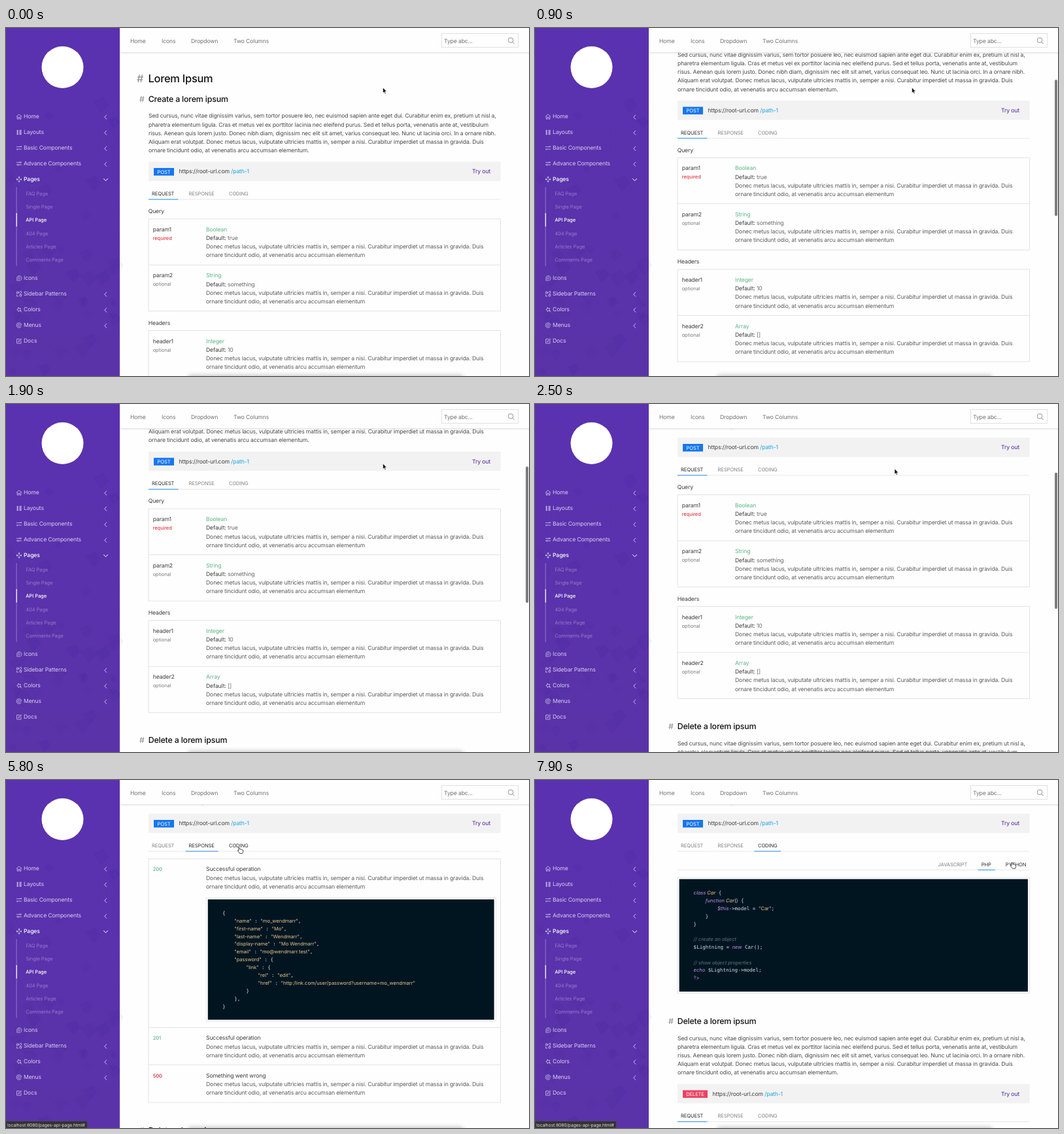
An HTML page for the animation above (8000 ms loop, 800 by 532 pixels).

```html
<!DOCTYPE html>
<html lang="en">
<head>
<meta charset="utf-8">
<title>API page</title>
<style>
html, body { margin: 0; width: 100%; height: 100%; overflow: hidden; background: #fefefe; }
svg { display: block; width: 800px; height: 532px; }
text { font-family: Inter, Roboto, sans-serif; letter-spacing: -.0155em; white-space: pre; text-rendering: geometricPrecision; }
.big { letter-spacing: -.015em; }
.code { letter-spacing: -.003em; fill: #d6deeb; }
.p { font-family: "DejaVu Sans Mono", monospace; letter-spacing: 0; }
.s { fill: #ecc48d; }
.k { fill: #c792ea; font-style: italic; }
.y { fill: #ffcb8b; font-style: italic; }
.c { fill: #637777; font-style: italic; }
.u { fill: #c792ea; }
</style>
</head>
<body>
<svg id="stage" viewBox="0 0 800 532" xmlns="http://www.w3.org/2000/svg"></svg>
<script>
const BODY = 8.65, SMALL = 7.6, CODE = 7.55;
const LOOP = 8000, STEP = 100, PANEL_Y = 153;

const rect = (x, y, w, h, fill, more = '') =>
  `<rect x="${x}" y="${y}" width="${w}" height="${h}" fill="${fill}" ${more}/>`;
const frame = (x, y, w, h, color) => rect(x, y, w, h, 'none', `stroke="${color}" stroke-width=".8"`);
const hline = (y, color = '#dedede') => rect(218, y - .4, 538.5, .8, color);
const path = (d, stroke, width = .8, more = '') =>
  `<path d="${d}" fill="none" stroke="${stroke}" stroke-width="${width}" ${more}/>`;
// cy is the middle of the capital letters
const label = (x, cy, str, size = BODY, fill = '#484848', more = '') =>
  `<text x="${x}" y="${(cy + size * .364).toFixed(2)}" font-size="${size}" fill="${fill}" ${more}>${str}</text>`;
const group = (id, content, y = 0) => `<g id="${id}" transform="translate(0 ${y})">${content}</g>`;

function seeded(seed) {
  return () => (seed = (seed * 16807) % 2147483647) / 2147483647;
}

// ---------- sidebar ----------
const ICONS = {
  home: 'M0 4L4 .5L8 4M1.2 3.2V7.8H3.1V5H4.9V7.8H6.8V3.2',
  layouts: 'M.3 1.2H3M.3 3.2H3M.3 5.2H3M.3 7.2H3M4.2 1.2H8M4.2 3.2H8M4.2 5.2H8M4.2 7.2H8M1.7 .5V7.8M6 .5V7.8',
  swap: 'M0 2.2H8L6.2 .8M8 5.8H0L1.8 7.2',
  sliders: 'M0 2.2H4.6M6.6 2.2H8M0 5.8H1.4M3.4 5.8H8M5.6 1.2a1 1 0 1 0 .01 0M2.4 4.8a1 1 0 1 0 .01 0',
  move: 'M4 0V3M4 5V8M0 4H3M5 4H8M2.8 1.3L4 0L5.2 1.3M2.8 6.7L4 8L5.2 6.7M1.3 2.8L0 4L1.3 5.2M6.7 2.8L8 4L6.7 5.2',
  badge: 'M.6 7.4L1 5.8A3.7 3.7 0 1 1 2.6 7.4ZM2.5 4.5a1.6 1.6 0 1 1 3 0M2.7 5.2H5.3',
  blocks: 'M.4 .8h2.6v2.6h-2.6zM5 .4H7.6V3M.4 5v2.6H3M5 5h2.6v2.6H5zM3 2H5M6.3 3V5',
  star: 'M3 .6L4.3 2.5L6.6 2.2L5.6 4.2L7 6L4.7 5.8L3.2 7.4L2.8 5.2L.6 4.2L2.6 3ZM5.6 5.8L7.8 7.8',
  ring: 'M4 .2A3.8 3.8 0 1 0 7.4 5.6M4 .2A3.8 3.8 0 0 1 7.7 4.4M4 2.2A1.8 1.8 0 1 0 4 5.8A1.8 1.8 0 1 0 4 2.2',
  edit: 'M4.5 1H.6V7.6H7V4M2.8 5.4L3.1 4L6.6 .5L7.7 1.5L4.2 5.1Z'
};
const MENU = [
  ['Home', 135, 'home', 1], ['Layouts', 159, 'layouts', 1], ['Basic Components', 183, 'swap', 1],
  ['Advance Components', 207, 'sliders', 1], ['Pages', 231, 'move', 2], ['Icons', 382, 'badge', 0],
  ['Sidebar Patterns', 406, 'blocks', 1], ['Colors', 430, 'star', 1], ['Menus', 454, 'ring', 1], ['Docs', 478, 'edit', 0]
];
const SUBMENU = ['FAQ Page', 'Single Page', 'API Page', '404 Page', 'Articles Page', 'Comments Page'];

function sidebar() {
  const rnd = seeded(77);
  let out = rect(0, 0, 174, 532, 'url(#purple)');
  for (let i = 0; i < 44; i++) {
    const x = rnd() * 160, y = 50 + Math.sqrt(rnd()) * 475, r = 7 + rnd() * 11;
    out += `<path d="M${x} ${y}l${r} ${-r * .4}l${r * .5} ${r * .7}l${-r * .8} ${r * .8}z" fill="#2c1187" opacity="${.02 + rnd() * .06}"/>`;
  }
  out += '<circle cx="86.5" cy="60" r="32" fill="#fff"/>';
  for (const [name, y, icon, arrow] of MENU) {
    const open = arrow === 2, color = open ? '#fff' : '#d9cff0';
    out += path(ICONS[icon], color, .75, `transform="translate(16 ${y - 3.6})"`);
    out += label(27, y, name, BODY, color, open ? 'font-weight="500"' : '');
    if (arrow === 1) out += path(`M154 ${y - 2.2}L150.8 ${y + 1.2}L154 ${y + 4.6}`, color, .9);
    if (open) out += path(`M149.3 ${y - .8}L152.6 ${y + 2.6}L155.9 ${y - .8}`, color, 1);
  }
  out += rect(15.6, 243, 1, 121, '#9077c9') + rect(15.6, 283, 1.2, 20.5, '#fff');
  SUBMENU.forEach((name, i) => {
    const on = i === 2;
    out += label(30.3, 253.2 + i * 20.2, name, SMALL, on ? '#fff' : '#937bc8', on ? 'font-weight="500"' : '');
  });
  return out;
}

// ---------- top bar ----------
function topBar() {
  const links = [['Home', 190], ['Icons', 238], ['Dropdown', 283], ['Two Columns', 348]];
  return rect(174, 38, 626, 2, '#000', 'opacity=".03"') + rect(174, 0, 626, 37.6, '#fefefe') +
    rect(174, 37.2, 626, 1, '#dfdfdf') +
    links.map(([name, x]) => label(x, 19.6, name, BODY, '#707070')).join('') +
    frame(666.5, 8.5, 117, 21, '#d9d9d9') + label(670, 19.6, 'Type abc...', BODY, '#707070') +
    '<circle cx="772" cy="18.6" r="3.8" fill="none" stroke="#777" stroke-width=".8"/>' +
    path('M774.8 21.4L777.6 24.2', '#777', .9);
}

// ---------- tabs ----------
// name: [text x, underline start, underline width]
const MAIN_TABS = { REQUEST: [223, 218, 45.5], RESPONSE: [279.5, 274.5, 50], CODING: [341, 335.5, 40.5] };
const LANG_TABS = { JAVASCRIPT: [616.5, 610.5, 56], PHP: [682.7, 677.5, 26], PYTHON: [719.8, 714.5, 42] };

function tabs(id, set, cy) {
  const names = Object.keys(set);
  return hline(cy + 8.7, '#e2e2e2') +
    names.map(n => label(set[n][0], cy, n, SMALL, '#808080', `id="${id}-${n}"`)).join('') +
    rect(set[names[0]][1], cy + 8.2, set[names[0]][2], 1, '#2a8fee', `id="${id}-bar"`);
}

function setTabs(id, set, active, hover) {
  for (const n in set) {
    $(`${id}-${n}`).setAttribute('fill', n === active || n === hover ? '#2a2a2a' : '#808080');
  }
  $(`${id}-bar`).setAttribute('x', set[active][1]);
  $(`${id}-bar`).setAttribute('width', set[active][2]);
}

// ---------- page content ----------
const DETAIL = ['Donec metus lacus, vulputate ultricies mattis in, semper a nisi. Curabitur imperdiet ut massa in gravida. Duis',
  'ornare tincidunt odio, at venenatis arcu accumsan elementum'];
const PARAGRAPH = [
  'Sed cursus, nunc vitae dignissim varius, sem tortor posuere leo, nec euismod sapien ante eget dui. Curabitur enim ex, pretium ut nisl a,',
  'pharetra elementum ligula. Cras et metus vel ex porttitor lacinia nec eleifend purus. Sed et tellus porta, venenatis ante at, vestibulum',
  'risus. Aenean quis lorem justo. Donec nibh diam, dignissim nec elit sit amet, varius consequat leo. Nunc ut lacinia orci. In a ornare nibh.',
  'Aliquam erat volutpat. ' + DETAIL[0], DETAIL[1] + '.'];

const lines = (list, x, y, gap, fill) => list.map((s, i) => label(x, y + i * gap, s, BODY, fill)).join('');
const detail = y => lines(DETAIL, 306, y, 13.2, '#585858');

function section(id, title, method, color, width) {
  const urlX = 234 + width;
  return label(204, 108, '#', 12.4, '#888', 'class="big"') +
    label(217.7, 108, title, 12.4, '#111', 'class="big" font-weight="550"') +
    lines(PARAGRAPH, 218, 134.2, 13.2) +
    rect(218, 204.5, 538.5, 29.5, '#f2f2f2') + rect(226, 214, width, 11.6, color) +
    label(226 + width / 2, 220, method, SMALL, '#fff', 'text-anchor="middle"') +
    label(urlX - .5, 219.2, 'https://root-url.com <tspan fill="#1aa5df">/path-1</tspan>', BODY, '#3c3c3c') +
    label(713, 219.2, 'Try out', BODY, '#4a1d9e') +
    tabs(id, MAIN_TABS, 253.3);
}

function params(title, y, rows) {
  return label(217.7, y, title, BODY, '#3c3c3c') + frame(218, y + 11.8, 538.5, 141, '#dcdcdc') + hline(y + 82.2) +
    rows.map(([name, need, type, value], i) => {
      const top = y + 27.7 + i * 70.5;
      return label(224.7, top, name, BODY, '#3c3c3c') +
        label(224.7, top + 13.4, need, SMALL, need === 'required' ? '#e3212f' : '#808080') +
        label(306, top, type, BODY, '#5bb489') +
        label(306, top + 13.2, `Default: <tspan fill="#666">${value}</tspan>`, BODY, '#3c3c3c') + detail(top + 26.4);
    }).join('');
}

const request = () =>
  params('Query', 280, [['param1', 'required', 'Boolean', 'true'], ['param2', 'optional', 'String', 'something']]) +
  params('Headers', 450.7, [['header1', 'optional', 'Integer', '10'], ['header2', 'optional', 'Array', '[]']]);

// Each code line is an indent digit, then tokens split by "|" that start with their class letter.
function codeLines(list, x, y, gap) {
  return list.map((line, i) => line && label(x + line[0] * 18.2, y + i * gap,
    line.slice(1).split('|').map(t => `<tspan class="${t[0]}">${t.slice(1)}</tspan>`).join(''),
    CODE, '#d6deeb', 'class="code"')).join('');
}
const codeBox = (x, y, w, h) => frame(x, y, w, h, '#dfdfdf') + rect(x + 2.6, y + 2.5, w - 5.2, h - 5, '#011521');

const pair = (depth, key, value) => `${depth}s"${key}"|p : |s"${value}"|p,`;
const JSON_CODE = ['0p{',
  pair(1, 'name', 'mo_wendmarr'), pair(1, 'first-name', 'Mo'), pair(1, 'last-name', 'Wendmarr'),
  pair(1, 'display-name', 'Mo Wendmarr'), pair(1, 'email', 'mo@wendmarr.test'),
  '1s"password"|p : {', '2s"link"|p : {', pair(3, 'rel', 'edit'),
  '3s"href"|p : |s"http:/link.com/user/password?username=mo_wendmarr"', '2p}', '1p},', '0p}'];
const PHP_CODE = ['0kclass |yCar|p {', '1kfunction |yCar|n()|p {', '2k$this|p->model = |s"Car"|p;', '1p}', '0p}', '',
  '0c// create an object', '0p$Lightning = |knew|p Car();', '', '0c// show object properties',
  '0kecho|p $Lightning->model;', '0u?>'];
const JS_CODE = ['0kclass |yCar|p {', '1yconstructor|n()|p {', '2kthis|p.model = |s"Car"|p;', '1p}', '0p}', '',
  '0c// create an object', '0plightning = |knew|p Car();', '', '0c// show object properties',
  '0pconsole.log(lightning.model);'];

function response() {
  const rows = [['200', 136.2, 'Successful operation'], ['201', 394.2, 'Successful operation'], ['500', 451.7, 'Something went wrong']];
  return frame(218, 120.5, 538.5, 372.5, '#dcdcdc') + hline(378.5) + hline(435.5) +
    rows.map(([code, y, text]) =>
      label(224.7, y + .3, code, SMALL, code === '500' ? '#d9242c' : '#5bb489', 'font-weight="500"') +
      label(306, y, text, BODY, '#3c3c3c') + detail(y + 13.2)).join('') +
    codeBox(306.2, 180, 443, 189) + codeLines(JSON_CODE, 331, 203, 11.93);
}

const coding = () => tabs('lang', LANG_TABS, 128.8) + codeBox(218, 149, 538.5, 177) +
  group('js', codeLines(JS_CODE, 242.6, 172.6, 11.8)) + group('php', codeLines(PHP_CODE, 242.6, 172.6, 11.8));

// ---------- overlays ----------
const ARROW = '<path d="M0 0V8.4L1.9 6.7L3.1 9.4L4.5 8.8L3.3 6.1H5.8Z" fill="#111" stroke="#fff" stroke-width=".6"/>';
const HAND = '<path d="M-3 -3.9q.9-1 1.7.1l.7 2.5 .9-.5 1 .6 1-.2 .9.7 .8.3q.5 2.8-.8 5.2h-4.2q-1.4-2.5-3.3-4.3q.6-1.3 1.9-.3z" fill="#fff" stroke="#222" stroke-width=".8"/>';
const STATUS = '<path d="M0 521.5H122q2.5 0 2.5 2.5V532H0Z" fill="#323236" stroke="#55555a" stroke-width=".5"/>' +
  label(2, 527.3, 'localhost:8080/pages-api-page.html#', 6.8, '#e4e4e6');

const $ = id => document.getElementById(id);
const show = (id, on) => $(id).setAttribute('display', on ? 'inline' : 'none');
const move = (id, x, y) => $(id).setAttribute('transform', `translate(${x.toFixed(2)} ${y.toFixed(2)})`);

$('stage').innerHTML =
  '<defs><filter id="soft" x="-10%" y="-200%" width="120%" height="500%"><feGaussianBlur stdDeviation="3"/></filter>' +
  '<linearGradient id="purple" x2="0" y2="1"><stop stop-color="#5a31b0"/><stop offset="1" stop-color="#5a33a8"/></linearGradient></defs>' +
  rect(0, 0, 800, 532, '#fefefe') +
  group('page',
    label(200, 77.2, '#', 16.4, '#888', 'class="big"') +
    label(217.5, 77.2, 'Lorem Ipsum', 16.4, '#111', 'class="big" font-weight="550"') +
    section('first', 'Create a lorem ipsum', 'POST', '#1677ee', 31) +
    group('request', request()) + group('response', response(), PANEL_Y) + group('coding', coding(), PANEL_Y) +
    group('next', section('second', 'Delete a lorem ipsum', 'DELETE', '#ee4160', 38))) +
  topBar() + sidebar() +
  rect(278, 530, 422, 14, '#000', 'rx="5" opacity=".2" filter="url(#soft)"') +
  rect(795, 0, 4, 208.5, '#7d7d7d', 'rx="2" id="thumb"') +
  group('status', STATUS) + group('arrow', ARROW) + group('hand', HAND);

// ---------- motion ----------
const smooth = p => p * p * (3 - 2 * p);
const clamp = v => Math.min(1, Math.max(0, v));

// keys: [time, ...values], eased between neighbours
function track(keys, t, ease = smooth) {
  let i = keys.length - 1;
  while (i > 0 && keys[i][0] > t) i--;
  const a = keys[i], b = keys[i + 1] || a;
  const p = b === a ? 0 : ease(clamp((t - a[0]) / (b[0] - a[0])));
  return a.slice(1).map((v, k) => v + (b[k + 1] - v) * p);
}

const SCROLL = [[0, 0], [300, 22], [600, 62], [900, 93.5], [1900, 131.7], [2400, 153]];
const ARROW_PATH = [[0, 576.5, 91], [2300, 576.5, 91], [2500, 550, 99], [3000, 302, 101]];
const HAND_PATH = [[2900, 318, 106], [3100, 301, 106], [3500, 301, 106], [3900, 353, 108.5], [4900, 353, 108.5],
  [5500, 358.5, 107.5], [6200, 358.5, 107.5], [7000, 691, 131], [7500, 691, 131], [7900, 731.5, 130.5]];
const RESPONSE_AT = 3200, CODING_AT = 6100, PHP_AT = 7200;

function hoverOf(set, x) {
  return Object.keys(set).find(n => x >= set[n][1] && x <= set[n][1] + set[n][2]);
}

function draw(t) {
  const [scroll] = track(SCROLL, t, p => p);
  move('page', 0, -scroll);
  $('thumb').setAttribute('y', 38.6 + scroll * .432);
  $('thumb').setAttribute('opacity', t < 100 ? 0 : 1 - clamp((t - 2900) / 300));

  const tab = t < RESPONSE_AT ? 'REQUEST' : t < CODING_AT ? 'RESPONSE' : 'CODING';
  const lang = t < PHP_AT ? 'JAVASCRIPT' : 'PHP';
  for (const n in MAIN_TABS) show(n.toLowerCase(), n === tab);
  show('js', lang === 'JAVASCRIPT');
  show('php', lang === 'PHP');
  move('next', 0, { REQUEST: 537.5, RESPONSE: 580, CODING: 413.3 }[tab]);

  const overTabs = t >= 2900, [hx, hy] = track(HAND_PATH, t);
  const [ax, ay] = track(ARROW_PATH, t);
  const travelling = t > 6300 && t < 6900;
  show('status', overTabs);
  show('hand', overTabs && !travelling);
  show('arrow', !overTabs || travelling);
  move('hand', hx, hy);
  if (travelling) move('arrow', hx - 2, hy - 4);
  else move('arrow', ax, ay);
  setTabs('first', MAIN_TABS, tab, overTabs && hy < 112 ? hoverOf(MAIN_TABS, hx) : '');
  setTabs('second', MAIN_TABS, 'REQUEST', '');
  setTabs('lang', LANG_TABS, lang, hy > 120 ? hoverOf(LANG_TABS, hx) : '');
}

const start = performance.now();
function tick() {
  const t = (performance.now() - start) % LOOP;
  draw(Math.floor(t / STEP) * STEP);
  requestAnimationFrame(tick);
}
draw(0);
requestAnimationFrame(tick);
</script>
</body>
</html>
```
